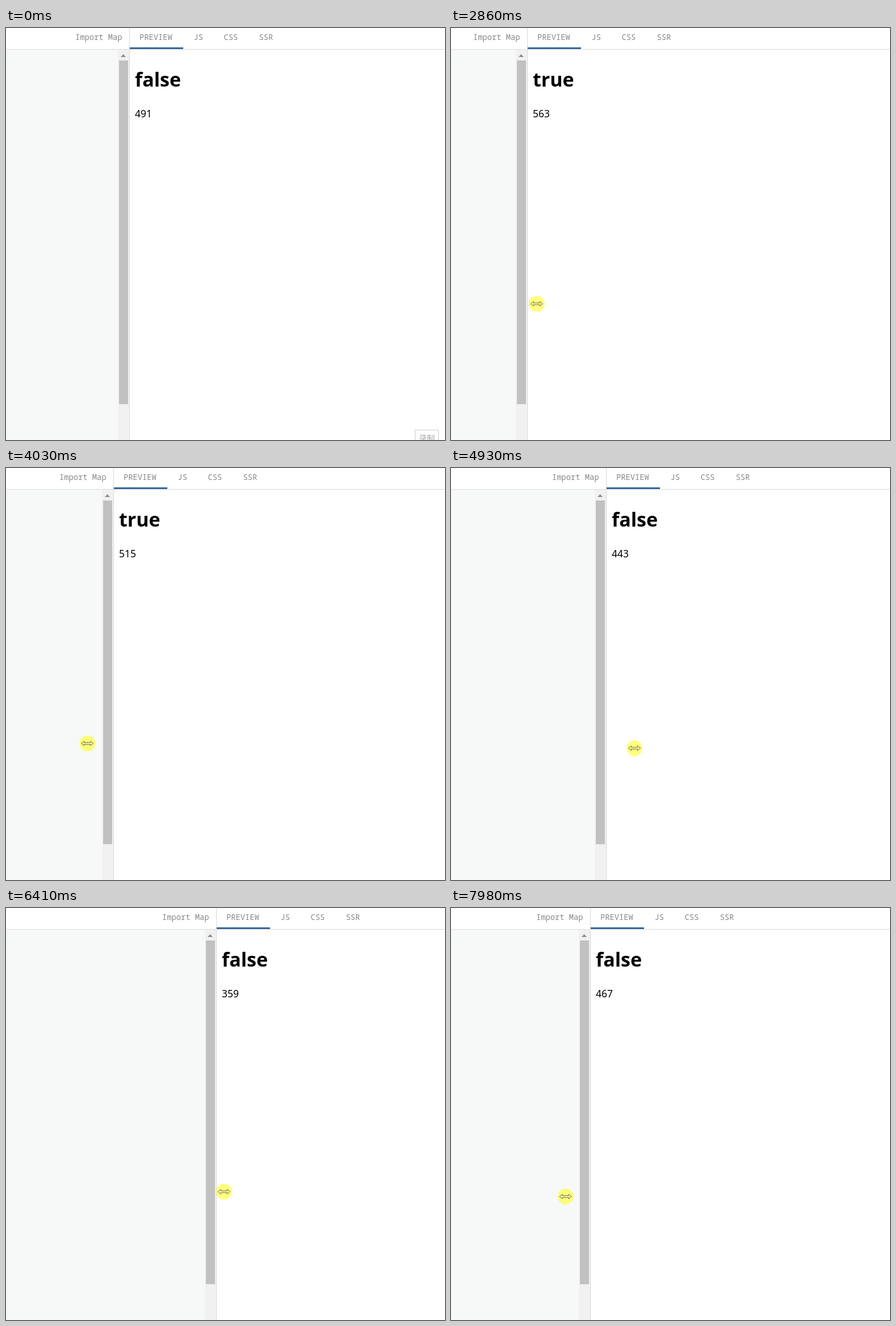
An HTML page that plays this animation: 773x724 px, repeating every 8000 ms.

```html
<!DOCTYPE html>
<html lang="en">
<head>
<meta charset="utf-8">
<title>Resizable preview pane</title>
<style>
  html, body { margin: 0; width: 100%; height: 100%; overflow: hidden; background: #fff; }
  svg { display: block; width: 773px; height: 724px; }
  .tab { font: 13.75px "Noto Sans Mono", monospace; fill: #888; }
  .title { font: bold 34px "Noto Sans", "Open Sans", sans-serif; }
  .count { font: 17.4px "Noto Sans", "Open Sans", sans-serif; }
  .button { font: 14px "Noto Sans CJK SC", "Noto Sans CJK", sans-serif; fill: #aaa; }
</style>
</head>
<body>
<svg viewBox="0 0 773 724">
  <rect width="773" height="724" fill="#fff"/>
  <rect id="editor" y="38" height="686" fill="#f7f9f9"/>
  <rect y="37" width="773" height="1" fill="#ddd"/>
  <g id="pane">
    <rect x="-20" y="38" width="20" height="686" fill="#f1f1f1"/>
    <path d="M-15 51L-10.5 46L-6 51Z" fill="#8b8b8b"/>
    <rect id="thumb" x="-18" y="57" width="16" height="604"/>
    <rect width="1" height="724" fill="#d9d9d9"/>
    <rect x="1" y="34" width="94" height="3" fill="#36689c"/>
    <g class="tab">
      <text x="-95" y="20.5">Import Map</text>
      <text x="18" y="20.5">PREVIEW</text>
      <text x="113.5" y="20.5">JS</text>
      <text x="166.5" y="20.5">CSS</text>
      <text x="228.5" y="20.5">SSR</text>
    </g>
    <text id="title" class="title" x="10" y="103"></text>
    <text id="count" class="count" x="10" y="157"></text>
  </g>
  <g id="button">
    <rect x="720.5" y="706.5" width="41" height="30" fill="#fff" stroke="#ccc"/>
    <text class="button" x="727" y="726">录制</text>
  </g>
  <g id="cursor">
    <circle r="14" fill="#ff0" fill-opacity=".5"/>
    <path id="resize" d="M-10.5 0L-5.5 -4V-1.5H5.5V-4L10.5 0L5.5 4V1.5H-5.5V4Z" fill="#fffbb0" stroke="#5f5a28" stroke-width=".9"/>
    <path id="arrow" d="M0 0V16L3.7 12.5L6.2 18L8.6 17L6.2 11.6H11.3Z" fill="#fff" stroke="#333" stroke-width=".9"/>
  </g>
</svg>
<script>
const LOOP = 8000, GRAB = 1190, LAG = 75, STEP = 13.88, HOME = 217;
const el = id => document.getElementById(id);
const [editor, pane, thumb, title, count, button, cursor, resize, arrow] =
  ["editor", "pane", "thumb", "title", "count", "button", "cursor", "resize", "arrow"].map(el);

// turning points of the pointer as [ms, px]
const turnsX = [
  [20, 738], [740, 178], [840, 178], [GRAB, 215], [1425, 215],
  [2500, 94], [3600, 328], [4250, 80], [4450, 75], [5181, 411],
  [5831, 62], [6400, 384], [7103, 100], [7521, 425], [8118, 170]
];
const turnsY = [[20, 742], [740, 500], [840, 500], [GRAB, 486], [4030, 484], [5700, 499], [7170, 498], [LOOP, 507]];

// swing from one turning point to the next along a cosine
function swing(turns, t) {
  const i = turns.findIndex(p => p[0] > t);
  if (i <= 0) return turns.at(i)[1];
  const [t0, a] = turns[i - 1], [t1, b] = turns[i];
  return a + (b - a) * (1 - Math.cos(Math.PI * (t - t0) / (t1 - t0))) / 2;
}

function draw(t) {
  const x = swing(turnsX, t), y = swing(turnsY, t);
  const dragging = t >= GRAB;

  // the divider trails the pointer and snaps to whole percents
  const k = dragging ? Math.round((HOME - swing(turnsX, Math.max(GRAB, t - LAG))) / STEP) : 0;
  const split = Math.round(HOME - k * STEP), size = 491 + 12 * k;
  pane.setAttribute("transform", `translate(${split} 0)`);
  editor.setAttribute("width", split - 20);
  title.textContent = size > 500;
  count.textContent = size;

  thumb.setAttribute("fill", !dragging && x >= 199 && x < 215 ? "#a8a8a8" : "#c1c1c1");
  cursor.setAttribute("transform", `translate(${x.toFixed(1)} ${y.toFixed(1)})`);
  cursor.setAttribute("visibility", t < 20 ? "hidden" : "visible");
  resize.setAttribute("opacity", dragging ? 1 : 0);
  arrow.setAttribute("opacity", dragging ? 0 : 1);
  button.setAttribute("opacity", Math.min(1, Math.max(0, (120 - t) / 100)));
}

const start = performance.now();
function tick() {
  draw((performance.now() - start) % LOOP);
  requestAnimationFrame(tick);
}
tick();
</script>
</body>
</html>
```
